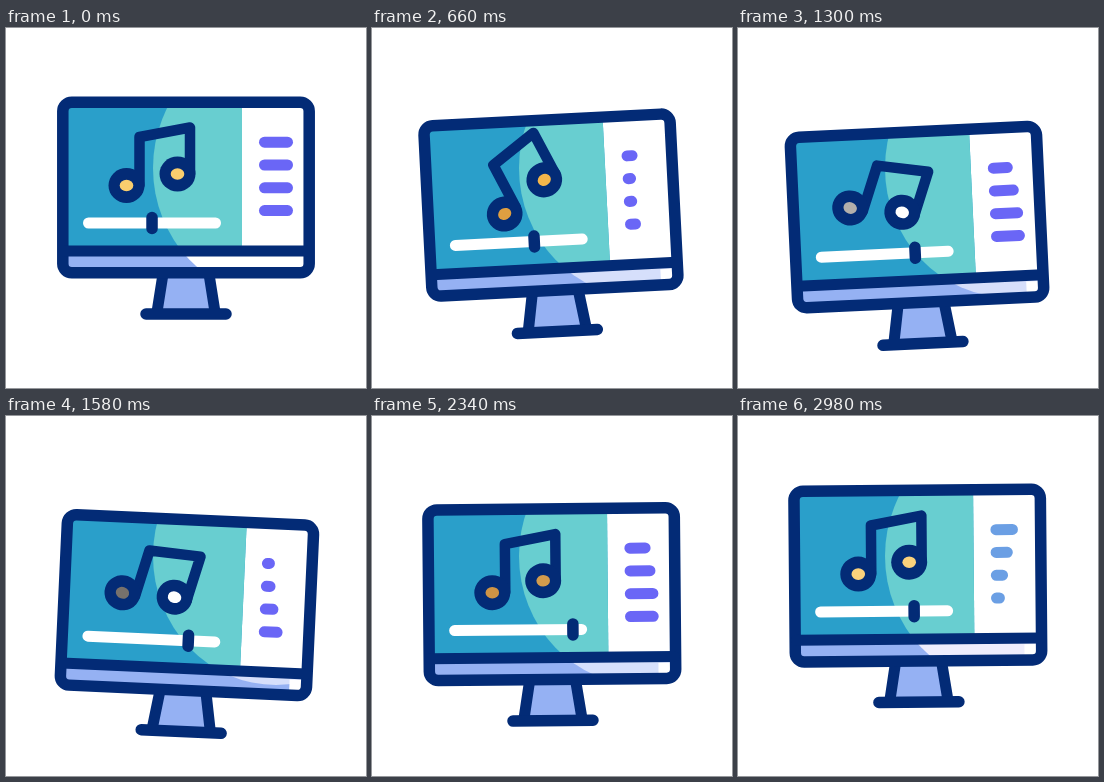
An HTML page with a canvas for the animation above (3 s loop, 360 px wide and 360 px high).

```html
<!DOCTYPE html>
<html lang="en">
<head>
<meta charset="utf-8">
<title>Music player</title>
<style>
html, body { margin: 0; width: 100%; height: 100%; overflow: hidden; background: #fff; }
canvas { display: block; width: 360px; height: 360px; }
</style>
</head>
<body>
<canvas id="stage"></canvas>
<script>
const LOOP = 3000;
const NAVY = '#032b76', DEEP = '#2a9fca', AQUA = '#68ced0', PERI = '#95b1f3';
const canvas = document.getElementById('stage');
const ctx = canvas.getContext('2d');
const dpr = window.devicePixelRatio || 1;
canvas.width = canvas.height = 360 * dpr;

// Smooth curve through [time, value] keys, flat at turning points
function curve(keys) {
  const n = keys.length;
  const grad = i => (keys[i + 1][1] - keys[i][1]) / (keys[i + 1][0] - keys[i][0]);
  const slope = keys.map((k, i) => {
    if (i === 0 || i === n - 1) return i ? grad(n - 2) : 0;
    const a = grad(i - 1), b = grad(i);
    return a * b <= 0 ? 0 : 2 * a * b / (a + b);
  });
  return t => {
    let i = 0;
    while (i < n - 2 && t >= keys[i + 1][0]) i++;
    const h = keys[i + 1][0] - keys[i][0];
    const p = Math.min(1, (t - keys[i][0]) / h), q = 1 - p;
    return keys[i][1] * q * q * (1 + 2 * p) + keys[i + 1][1] * p * p * (3 - 2 * p)
      + h * p * q * (q * slope[i] - p * slope[i + 1]);
  };
}

const ease = p => (1 - Math.cos(Math.PI * Math.max(0, Math.min(1, p)))) / 2;

// Eased steps between [time, value] keys
function swing(keys) {
  return t => {
    let i = 0;
    while (i < keys.length - 2 && t >= keys[i + 1][0]) i++;
    const [t0, a] = keys[i], [t1, b] = keys[i + 1];
    return a + (b - a) * ease((t - t0) / (t1 - t0));
  };
}

// Linear blend between [time, hex] keys
function tint(keys) {
  return t => {
    let i = 0;
    while (i < keys.length - 2 && t >= keys[i + 1][0]) i++;
    const [t0, a] = keys[i], [t1, b] = keys[i + 1];
    const p = Math.max(0, Math.min(1, (t - t0) / (t1 - t0)));
    const mix = s => Math.round((a >> s & 255) * (1 - p) + (b >> s & 255) * p);
    return `rgb(${mix(16)},${mix(8)},${mix(0)})`;
  };
}

const tilt = curve([[0, 0], [300, -0.55], [540, -1.9], [660, -2.9], [1000, -6.7],
  [1580, 2.6], [1790, 4.6], [2000, 3.2], [2250, 0.3], [2600, -2.1], [2980, -0.5], [3000, -0.4]]);
const noteTilt = swing([[0, 0], [620, -25.5], [1400, 22], [2020, -14], [2600, 10], [3000, 0]]);
const leftEye = tint([[0, 0xf9ce6e], [660, 0xdf9f40], [1000, 0xf4f2f0], [1580, 0x77716c],
  [2000, 0xeaa440], [2660, 0xb5854a], [2980, 0xfbd27c]]);
const rightEye = tint([[0, 0xf9ce6e], [660, 0xf4b64a], [1000, 0xffffff], [1580, 0xffffff],
  [2000, 0xf4b450], [2660, 0xb5854a], [2980, 0xfbd27c]]);
const shine = tint([[0, 0xffffff], [500, 0xd6dffb], [2700, 0xd6e0fc], [2980, 0xeeedfd]]);
const barColor = tint([[0, 0x6a66f6], [2800, 0x6a66f6], [2980, 0x6b9fe4]]);

const drop = t => 29.6 * ease(Math.min(t, LOOP + 30 - t) / 1180);
const knobShift = t => t < 2560 ? t * 0.0234 : 59.9 - (t - 2560) * 0.071;

function barWidth(t, i) {
  const age = Math.max(0, t - i * 87);
  return 13 + 21 * (1 + Math.cos(2 * Math.PI * age / 1060)) / 2;
}

function line(color, width, ...pts) {
  ctx.strokeStyle = color;
  ctx.lineWidth = width;
  ctx.beginPath();
  for (let i = 0; i < pts.length; i += 2) ctx.lineTo(pts[i], pts[i + 1]);
  ctx.stroke();
}

function box(color, x, y, w, h) {
  ctx.fillStyle = color;
  ctx.fillRect(x, y, w, h);
}

function oval(color, x, y, rx, ry) {
  ctx.fillStyle = color;
  ctx.beginPath();
  ctx.ellipse(x, y, rx, ry, 0, 0, 2 * Math.PI);
  ctx.fill();
}

function turn(deg, x, y) {
  ctx.translate(x, y);
  ctx.rotate(deg * Math.PI / 180);
  ctx.translate(-x, -y);
}

// Light disc stays put on the stage while the monitor moves under it
function glow(color, x, y, w, h) {
  ctx.save();
  ctx.beginPath();
  ctx.rect(x, y, w, h);
  ctx.clip();
  ctx.setTransform(dpr, 0, 0, dpr, 0, 0);
  oval(color, 270, 140, 123, 129);
  ctx.restore();
}

function stand() {
  ctx.fillStyle = PERI;
  ctx.beginPath();
  ctx.moveTo(157, 246);
  ctx.lineTo(203, 246);
  ctx.lineTo(209, 285);
  ctx.lineTo(151, 285);
  ctx.fill();
  line(NAVY, 11, 157, 246, 151, 284);
  line(NAVY, 11, 203, 246, 209, 284);
  line(NAVY, 11.5, 140, 286, 220, 286);
}

function screen(t) {
  box('#fff', 57, 74, 246, 171);
  box(DEEP, 57, 74, 179, 149);
  glow(AQUA, 57, 74, 179, 149);
  box(PERI, 57, 223, 246, 22);
  glow(shine(t), 57, 223, 246, 22);
  box('#fff', 286, 229, 15, 12);
  for (let i = 0; i < 4; i++) {
    const y = 114.2 + i * 22.8;
    line(barColor(t), 11, 258.5, y, 247.5 + barWidth(t, i), y);
  }
  line('#fff', 11, 82.5, 195, 209.5, 195);
  const x = 146 + knobShift(t);
  line(NAVY, 11.5, x, 189.5, x, 200.5);
}

function note(t) {
  ctx.save();
  turn(noteTilt(t), 146, 133);
  line(NAVY, 10.5, 133.5, 157, 133.5, 109, 184, 99.5, 184, 146);
  oval(NAVY, 120.5, 157.5, 18, 17.5);
  oval(NAVY, 171.5, 146, 18, 17.5);
  oval(leftEye(t), 120.5, 157.5, 6.8, 5.8);
  oval(rightEye(t), 171.5, 146, 6.8, 5.8);
  ctx.restore();
}

function frame() {
  ctx.strokeStyle = NAVY;
  ctx.lineWidth = 11.5;
  ctx.beginPath();
  ctx.roundRect(56.8, 74.2, 246.4, 170.6, 9);
  ctx.stroke();
  line(NAVY, 11, 58, 223, 302, 223);
}

function draw(t) {
  ctx.setTransform(dpr, 0, 0, dpr, 0, 0);
  ctx.lineCap = ctx.lineJoin = 'round';
  box('#fff', 0, 0, 360, 360);
  ctx.translate(0, drop(t));
  turn(tilt(t), 180, 180);
  stand();
  screen(t);
  note(t);
  frame();
}

const start = performance.now();
function tick() {
  draw((performance.now() - start) % LOOP);
  requestAnimationFrame(tick);
}
tick();
</script>
</body>
</html>
```
